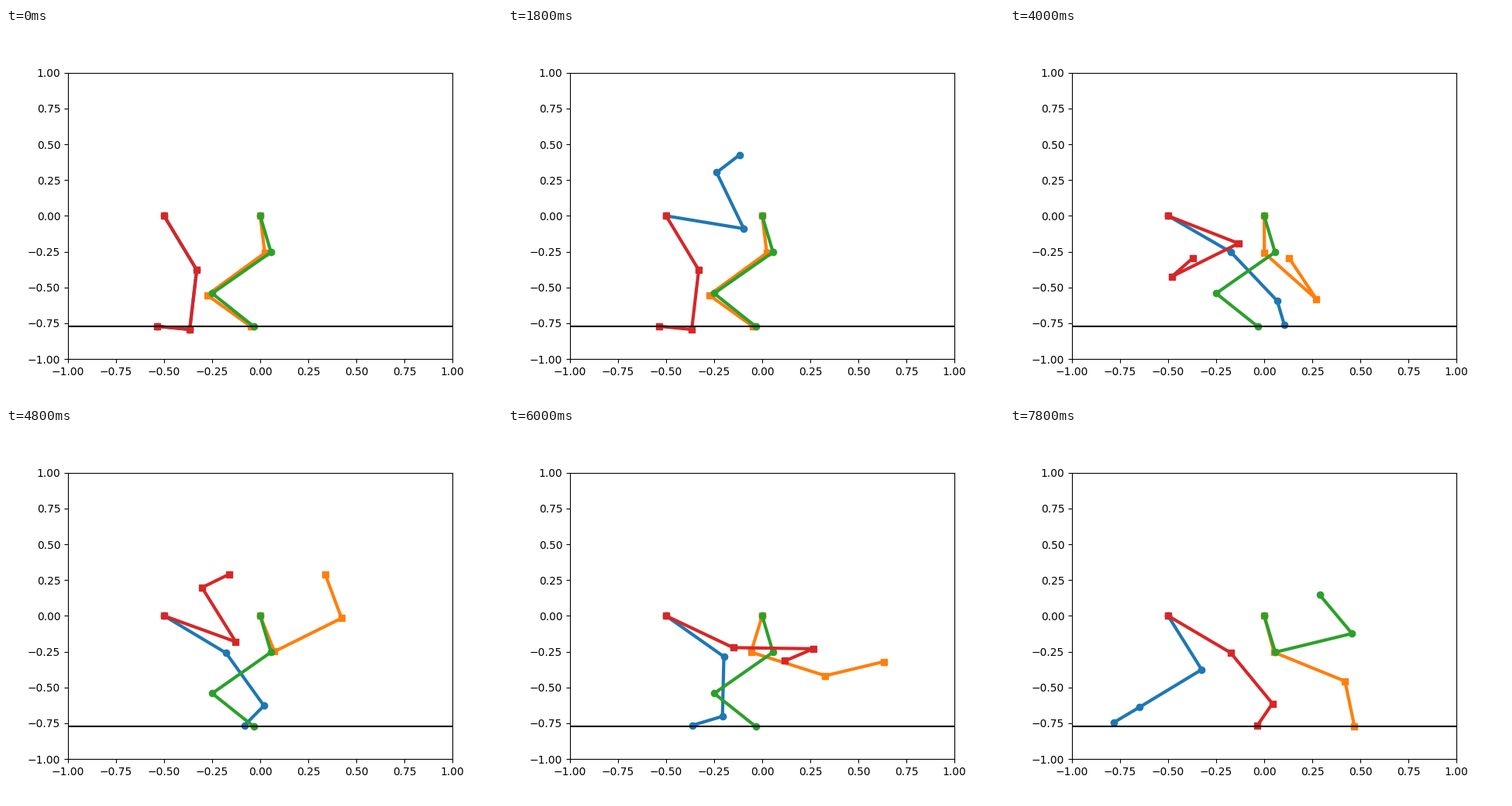
Animation, 640 px wide and 480 px high, one loop 8 s. Source, as a matplotlib script:

```python
import numpy as np
import matplotlib.pyplot as plt
from matplotlib.animation import FuncAnimation

FRAMES, STEP_MS = 40, 200
GROUND = -0.772
SWEEPS = 3  # solver passes per step

# Foot path relative to the hip: lift, lower, then push back along the ground.
PATH_STEP = (1, 9, 17, 39)
PATH_X = (-0.03, 0.395, 0.75, -0.29)
PATH_Y = (-0.734, 0.44, -0.765, -0.765)

HIND = (0.414, 0.417, 0.17)
FORE = (0.26, 0.42, 0.318)


def joints(angles, links):
    """Positions of all joints, hip first, as complex numbers."""
    return np.cumsum(np.r_[0, np.array(links) * np.exp(1j * angles)])


def reach(angles, links, goal):
    """Cyclic coordinate descent: turn each joint, foot first, to the goal."""
    angles = angles.copy()
    for _ in range(SWEEPS):
        for j in reversed(range(len(links))):
            pts = joints(angles, links)
            angles[j:] += np.angle((goal - pts[j]) / (pts[-1] - pts[j]))
    return angles


def walk(start, links):
    """Poses of one leg for every step, beginning at rest."""
    poses = [np.radians(start)]
    for step in range(2, FRAMES):
        goal = complex(np.interp(step, PATH_STEP, PATH_X),
                       np.interp(step, PATH_STEP, PATH_Y))
        poses.append(reach(poses[-1], links, goal))
    return poses


class Leg:
    def __init__(self, ax, hip, links, start, delay, style):
        self.hip, self.links, self.delay = hip, links, delay
        self.poses = walk(start, links)
        self.line, = ax.plot([], [], style, lw=3)

    def draw(self, frame):
        pose = self.poses[max(frame - self.delay - 1, 0)]
        pts = self.hip + joints(pose, self.links)
        self.line.set_data(pts.real, pts.imag)
        return self.line


fig, ax = plt.subplots(figsize=(6.4, 4.8), dpi=100)
ax.set(xlim=(-1, 1), ylim=(-1, 1))

legs = [
    Leg(ax, -0.5, HIND, (-65.8, -95, 172.7), 0, "o-"),
    Leg(ax, 0, FORE, (-84.7, -135.6, -44), 16, "s-"),
    Leg(ax, 0, FORE, (-77.5, -136.8, -46.9), 32, "o-"),
    Leg(ax, -0.5, HIND, (-65.8, -95, 172.7), 16, "s-"),
]
ax.plot([-1, 1], [GROUND, GROUND], "k-")


def update(frame):
    return [leg.draw(frame) for leg in legs]


anim = FuncAnimation(fig, update, frames=FRAMES, interval=STEP_MS,
                     repeat=True, repeat_delay=0)
plt.show()
```
